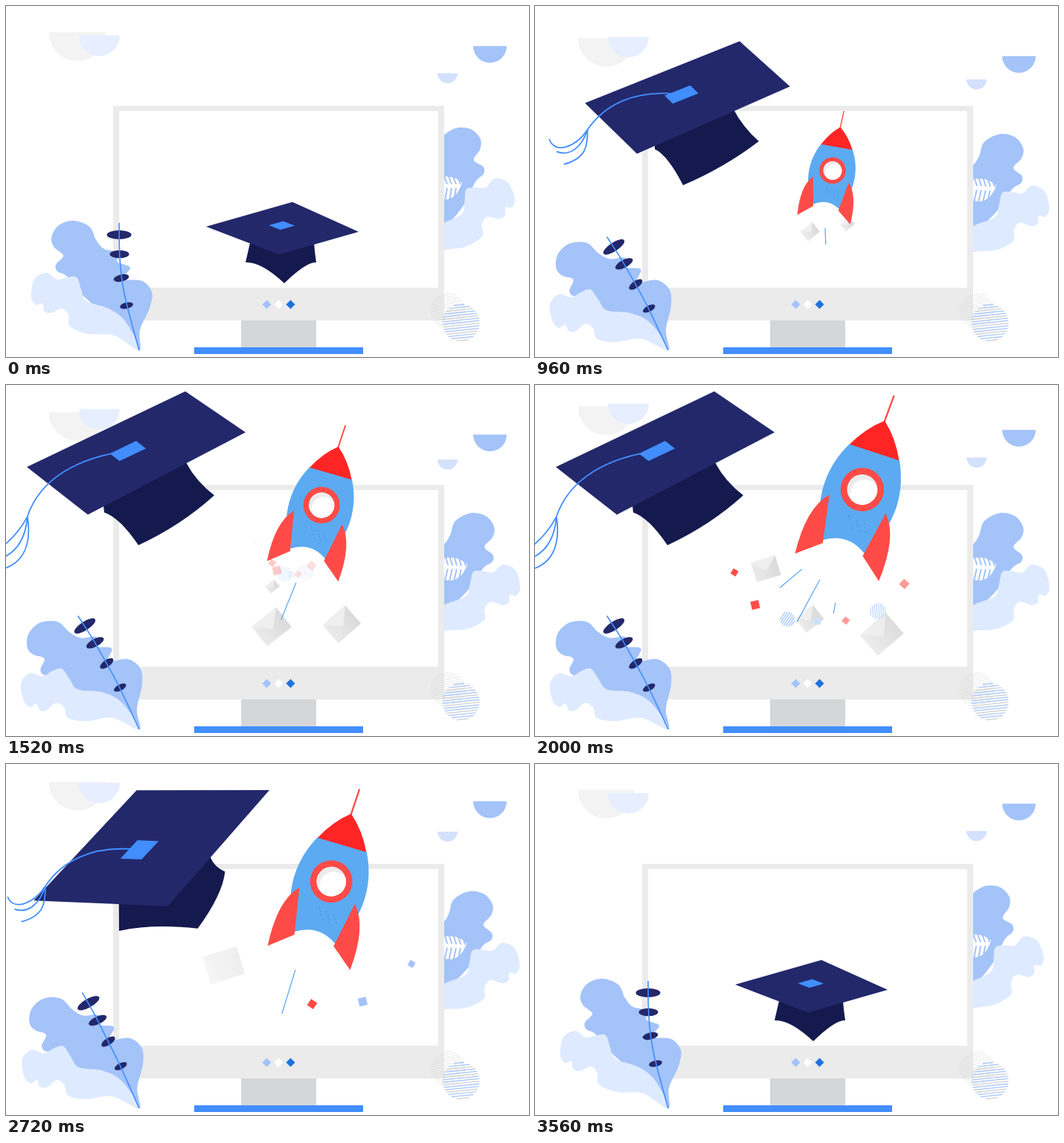
Animation of 703x471 px, one loop 3600 ms. Source, as an HTML page with a canvas:

```html
<!DOCTYPE html>
<html lang="en">
<head>
<meta charset="utf-8">
<title>Graduation launch</title>
<style>
html, body { margin: 0; width: 100%; height: 100%; overflow: hidden; background: #fff; }
canvas { display: block; width: 703px; height: 471px; }
</style>
</head>
<body>
<canvas id="stage" width="703" height="471"></canvas>
<script>
const ctx = document.getElementById('stage').getContext('2d');
const LOOP = 3600, RAD = Math.PI / 180;
const NAVY = '#23286b', DEEP = '#141a4e', BLUE = '#428eff', SKY = '#a3c3f9',
      PALE = '#deeaff', RED = '#ff4b47', PINK = '#ff9a96';

// Timing
const clamp = v => Math.max(0, Math.min(1, v));
const mix = (a, b, f) => a + (b - a) * f;
const span = (t, a, b) => clamp((t - a) / (b - a));
const ease = (t, a, b) => { const p = span(t, a, b); return p * p * (3 - 2 * p); };
const decel = (p, power) => 1 - (1 - p) ** power;
const bump = (t, a, b) => Math.sin(Math.PI * span(t, a, b));
const kick = (t, a, b) => Math.sin(Math.PI * Math.sqrt(span(t, a, b)));

// Drawing
function fill(color, build) {
  ctx.fillStyle = color;
  ctx.beginPath();
  build();
  ctx.fill();
}

function stroke(color, width, build) {
  ctx.strokeStyle = color;
  ctx.lineWidth = width;
  ctx.beginPath();
  build();
  ctx.stroke();
}

function poly(pts) {
  pts.forEach((p, i) => i ? ctx.lineTo(...p) : ctx.moveTo(...p));
  ctx.closePath();
}

const rect = (color, x, y, w, h) => fill(color, () => ctx.rect(x, y, w, h));
const circle = (color, x, y, r) => fill(color, () => ctx.arc(x, y, r, 0, 7));

// Closed Catmull-Rom outline.
function blob(pts) {
  const n = pts.length, at = i => pts[(i + n) % n];
  ctx.moveTo(...pts[0]);
  for (let i = 0; i < n; i++) {
    const [a, b, c, d] = [at(i - 1), at(i), at(i + 1), at(i + 2)];
    ctx.bezierCurveTo(b[0] + (c[0] - a[0]) / 6, b[1] + (c[1] - a[1]) / 6,
      c[0] - (d[0] - b[0]) / 6, c[1] - (d[1] - b[1]) / 6, c[0], c[1]);
  }
}

function placed(x, y, angle, scale, draw) {
  ctx.save();
  ctx.translate(x, y);
  ctx.rotate(angle * RAD);
  ctx.scale(scale, scale);
  draw();
  ctx.restore();
}

function hatch(x, y, r, angle, gap, colors, width, dash = []) {
  placed(x, y, angle, 1, () => {
    ctx.setLineDash(dash);
    let i = 0;
    for (let v = -r + 1; v < r; v += gap) {
      const half = Math.sqrt(r * r - v * v);
      stroke(colors[i++ % colors.length], width, () => {
        ctx.moveTo(-half, v);
        ctx.lineTo(half, v);
      });
    }
  });
}

// Floating half discs: colour, x, radius, mean y, swing, time of lowest point
const discs = [
  ['#f3f3f3', 96, 38.5, 33.5, 9.8, 800], ['#e6eeff', 125.5, 27.5, 33.5, 10.5, 550],
  [SKY, 650.5, 22.5, 58.5, 9.5, 1200], ['#d3e1fd', 593.5, 13.5, 94.5, 5.5, 1400]
];

function drawDiscs(t) {
  for (const [color, x, r, y, swing, low] of discs) {
    const top = y + swing * Math.cos(2 * Math.PI * (t - low) / LOOP);
    fill(color, () => ctx.arc(x, top, r, 0, Math.PI));
  }
}

// Plants
const FOOT = [179, 462];
const leafDark = [[179, 462], [150, 428], [105, 390], [82, 363], [69, 356], [67, 347], [77, 335],
  [65, 324], [61, 311], [70, 295], [90, 288], [112, 296], [121, 314], [132, 326], [152, 331],
  [149, 343], [167, 351], [157, 366], [183, 369], [196, 384], [193, 405], [180, 435]];
const leafLight = [[179, 462], [145, 442], [110, 440], [86, 430], [84, 415], [75, 406], [60, 412],
  [51, 409], [49, 399], [40, 401], [34, 390], [38, 367], [54, 358], [68, 367], [82, 364], [95, 364],
  [101, 380], [108, 396], [138, 406], [161, 424]];
const stalk = [[179, 462], [162, 402], [155, 365], [152.5, 333], [152, 307], [152, 291]];

// Curls a point along the line from the foot to a tip; returns x, y and the local turn.
function curl([x, y], angle, tip, root) {
  const tx = tip[0] - FOOT[0], ty = tip[1] - FOOT[1], len = Math.hypot(tx, ty);
  const dx = x - FOOT[0], dy = y - FOOT[1];
  const along = (dx * tx + dy * ty) / len, across = (dy * tx - dx * ty) / len;
  const turn = f => angle * RAD * (root + (1 - root) * f);
  const heading = Math.atan2(ty, tx), spine = heading + turn(along / len / 2);
  const local = turn(along / len), side = heading + local + Math.PI / 2;
  return [FOOT[0] + along * Math.cos(spine) + across * Math.cos(side),
    FOOT[1] + along * Math.sin(spine) + across * Math.sin(side), local];
}

// A short lean inwards, then blown outwards until the return.
const sway = (t, inward, outward) =>
  inward * bump(t, 0, 880) - outward * (ease(t, 480, 920) - ease(t, 2500, 3560));

function drawLeaves(lean) {
  fill(SKY, () => blob(leafDark.map(p => curl(p, lean, [90, 288], .3))));
  fill(PALE, () => blob(leafLight.map(p => curl(p, lean * .78, [45, 375], .3))));
}

function drawLeftPlant(t) {
  drawLeaves(sway(t, 17.9, 24.5));
  const s = stalk.map(p => curl(p, sway(t, 9, 36), [152, 291], .08));
  for (let i = 1; i < 5; i++) {
    const [x, y, turn] = s[i], tilt = i < 3 ? -13 * RAD : 0;
    fill(NAVY, () => ctx.ellipse(x, y, 8.5 + 2 * i * i / 4, 3.5 + .6 * i, turn + tilt, 0, 7));
  }
  stroke(BLUE, 1.6, () => {
    ctx.moveTo(s[0][0], s[0][1]);
    for (let i = 1; i < 4; i++) {
      ctx.quadraticCurveTo(s[i][0], s[i][1], (s[i][0] + s[i + 1][0]) / 2, (s[i][1] + s[i + 1][1]) / 2);
    }
    ctx.lineTo(s[5][0], s[5][1]);
  });
}

function drawRightPlant(t) {
  const lean = .42 * sway(t, 17.9, 24.5);
  ctx.save();
  ctx.translate(730, -109);
  ctx.scale(-1, 1);
  drawLeaves(18 + lean);
  ctx.restore();
  placed(551, 353, -.35 * lean, 1, () => {
    ctx.translate(-551, -353);
    fill('#fff', () => {
      ctx.moveTo(613, 237);
      ctx.quadraticCurveTo(596, 222, 572, 234);
      ctx.lineTo(580, 258);
      ctx.quadraticCurveTo(604, 266, 613, 237);
    });
    for (let x = 585; x < 610; x += 6) {
      stroke(SKY, 2, () => {
        ctx.moveTo(x - 3, 226);
        ctx.lineTo(x + 2, 239);
        ctx.moveTo(x + 2, 244);
        ctx.lineTo(x - 1, 262);
      });
    }
  });
}

function drawMonitor() {
  rect('#ebebeb', 144, 134, 445, 288);
  rect('#fff', 152, 141, 429, 237);
  rect('#d5d6d8', 316, 422, 101, 36);
  rect(BLUE, 253, 458, 227, 9);
  [SKY, '#fff', '#1f72dd'].forEach((color, i) => {
    const x = 350.5 + 16 * i;
    fill(color, () => poly([[x - 6, 400.5], [x, 394.5], [x + 6, 400.5], [x, 406.5]]));
  });
  hatch(594, 409, 23.5, 12, 3, ['#d4d4d4'], .8, [1.5, 1]);
  hatch(611.5, 425, 25, -6, 3.4, [SKY, SKY, '#cdcdcd'], 1.2);
}

// Rocket, centred on its window
function fin(side) {
  fill(RED, () => {
    ctx.moveTo(41 * side, 21);
    ctx.quadraticCurveTo(66 * side, 47, 61 * side, 113);
    ctx.lineTo(29 * side, 87);
    ctx.closePath();
  });
}

function drawRocket(t) {
  const away = 1 - ease(t, 2550, 3400), p = span(t, 400, 2280);
  const rise = decel(p, 2.3) * away, drift = decel(p, 1.4) * away;
  const scale = .24 + .79 * decel(span(t, 200, 2280), 1.3) * away;
  placed(371 + 74 * drift, 325 - 187 * rise, 18.3 * rise, scale, () => {
    stroke(RED, 2.4, () => {
      ctx.moveTo(0, -97);
      ctx.lineTo(1.5, -137);
    });
    fill('#5caaf1', () => {
      ctx.moveTo(-36, -55);
      ctx.bezierCurveTo(-56, -18, -62, 32, -30, 83);
      ctx.quadraticCurveTo(0, 63, 30, 83);
      ctx.bezierCurveTo(62, 32, 56, -18, 36, -55);
    });
    fill('#ff2525', () => {
      ctx.moveTo(0, -100);
      ctx.quadraticCurveTo(22, -82, 36, -54);
      ctx.lineTo(-36, -54);
      ctx.quadraticCurveTo(-22, -82, 0, -100);
    });
    for (let i = 0; i < 12; i++) circle('#3f8fdc', -6 + i * 17 % 31, 40 + i * 11 % 17, .8);
    fin(-1);
    fin(1);
    circle(RED, 0, 0, 30);
    circle('#ececec', 0, 0, 21);
    ctx.beginPath();
    ctx.arc(0, 0, 21, 0, 7);
    ctx.clip();
    circle('#fff', 5, 5, 20);
  });
}

// Envelopes: birth, life, start, travel, width, angle
const envelopes = [
  [700, 1700, 400, 275, 70, 63, 46, -41], [700, 1150, 380, 286, -25, 42, 42, -38],
  [1240, 1160, 348, 230, 24, 95, 30, -38], [1500, 1380, 337, 211, -45, 60, 48, -17]
];

function drawEnvelopes(t) {
  for (const [born, life, x, y, dx, dy, size, angle] of envelopes) {
    const p = (t - born) / life;
    if (p <= 0 || p >= 1) continue;
    const e = decel(p, 2), w = size * Math.min(1, 1.2 * e), h = w * .8;
    placed(x + dx * e, y + dy * e, angle, 1, () => {
      ctx.globalAlpha = clamp(4 * (1 - p));
      const g = ctx.createLinearGradient(-w / 2, 0, w / 2, 0);
      g.addColorStop(0, '#ebebeb');
      g.addColorStop(1, '#dadada');
      fill(g, () => ctx.rect(-w / 2, -h / 2, w, h));
      fill('#efefef', () => poly([[-w / 2, -h / 2], [w / 2, -h / 2], [0, h * .1]]));
    });
  }
}

// A fan of confetti thrown out below the exhaust; every third piece is a striped disc.
function burst(t, born, x, y, first, step, colors) {
  const p = (t - born) / 1000;
  if (p <= 0 || p >= 1) return;
  colors.forEach((color, i) => {
    const angle = (first + step * i) * RAD;
    const reach = (100 + 18 * Math.cos(2 * angle)) * decel(p, 2) * 1.22;
    const size = 8 + i * 7 % 4;
    placed(x + reach * Math.cos(angle), y + reach * Math.sin(angle), 30 + 47 * i, 1, () => {
      ctx.globalAlpha = Math.min(1, 3 * p, 4 * (1 - p));
      if (i % 3 === 2 && step < 0) hatch(0, 0, size, 0, 2.8, [color], 1.4);
      else rect(color, -size / 2, -size / 2, size, size);
    });
  });
}

// Streaks: time fully drawn, start, angle, length
const streaks = [
  [960, 390, 298, 88, 22], [1520, 390, 265, 112, 54], [2000, 359, 247, 140, 39],
  [2000, 383, 261, 118.5, 65], [2000, 404, 292, 101, 15], [2720, 389, 276, 107, 62]
];

function drawStreaks(t) {
  for (const [mid, x, y, angle, length] of streaks) {
    const head = span(t, mid - 240, mid), tail = span(t, mid, mid + 260);
    if (head <= tail) continue;
    placed(x, y, angle, 1, () => stroke('#57a6f2', 1.2, () => {
      ctx.moveTo(length * tail, 0);
      ctx.lineTo(length * head, 0);
    }));
  }
}

// Cap points: at rest, in flight, and the shift of a unit twist
const board = [
  [269, 296, 28, 110, 6, -20], [385, 263, 241, 8.5, 30, 0],
  [474, 303, 322, 63.5, -6, 20], [367, 333.5, 110, 174, -30, 0]
];
const crown = [
  [328, 318, 131, 162, 0, 0], [322, 344, 132, 171, 0, -13], [343, 343, 153, 178, -9, -7],
  [374, 372, 178, 215, -22, 4], [404, 343, 236, 188, -14, 11], [417, 344, 280, 148, 0, 9],
  [415, 331, 256, 130, -2, 5], [414, 318, 242, 104, -5, 2]
];

function drawCap(t) {
  const fly = ease(t, 200, 1210) - ease(t, 2540, 3440);
  const twist = kick(t, 200, 1210) - 2.7 * kick(t, 2520, 3440);
  const pose = ([rx, ry, fx, fy, tx, ty]) => [mix(rx, fx, fly) + twist * tx, mix(ry, fy, fly) + twist * ty];
  const c = crown.map(pose), b = board.map(pose), [L, T, , B] = b;
  fill(DEEP, () => {
    ctx.moveTo(...c[0]);
    ctx.lineTo(...c[1]);
    ctx.quadraticCurveTo(...c[2], ...c[3]);
    ctx.quadraticCurveTo(...c[4], ...c[5]);
    ctx.quadraticCurveTo(...c[6], ...c[7]);
  });
  fill(NAVY, () => poly(b));
  const on = (u, v) => [0, 1].map(k => L[k] + u * (T[k] - L[k]) + v * (B[k] - L[k]));
  const u = .522 - .046 * fly, v = .42, du = .083, dv = .079;
  drawTassel(t, on(u, v));
  fill(BLUE, () => poly([on(u - du, v - dv), on(u + du, v - dv), on(u + du, v + dv), on(u - du, v + dv)]));
}

// Streams behind the moving cap and droops while it hovers.
function drawTassel(t, [x, y]) {
  const size = ease(t, 350, 900) - ease(t, 2720, 3280);
  if (size <= 0) return;
  const droop = ease(t, 900, 1550) - ease(t, 2300, 2800);
  const at = (x0, y0, x1, y1) => [mix(x0, x1, droop), mix(y0, y1, droop)];
  placed(x, y, 0, size, () => stroke(BLUE, Math.min(1.8, .8 / size + 1), () => {
    const knot = at(-126, 46, -135, 88);
    ctx.moveTo(0, 0);
    ctx.bezierCurveTo(...at(-66, -9, -66, 8), ...at(-105, 16, -118, 37), ...knot);
    ctx.translate(...knot);
    for (let i = 0; i < 3; i++) {
      ctx.moveTo(0, 0);
      ctx.bezierCurveTo(...at(8 * i - 16, 24, 7 * i - 9, 17 + 8 * i),
        ...at(21 * i - 45, 34 + 2 * i, 9 * i - 20, 30 + 16 * i),
        ...at(10 * i - 52, 12 + 17 * i, -34, 41 + 15 * i));
    }
  }));
}

function draw(t) {
  rect('#fff', 0, 0, 703, 471);
  drawDiscs(t);
  drawRightPlant(t);
  drawMonitor();
  drawEnvelopes(t);
  burst(t, 1420, 385, 235, 172, -26, [RED, RED, '#a9c9fb', '#d0e0fc', PINK, '#c5d9fc', PINK]);
  burst(t, 2140, 432, 240, 14, 45, [SKY, SKY, RED]);
  drawStreaks(t);
  drawRocket(t);
  drawLeftPlant(t);
  drawCap(t);
}

const start = performance.now();
function tick() {
  draw((performance.now() - start) % LOOP);
  requestAnimationFrame(tick);
}
tick();
</script>
</body>
</html>
```
